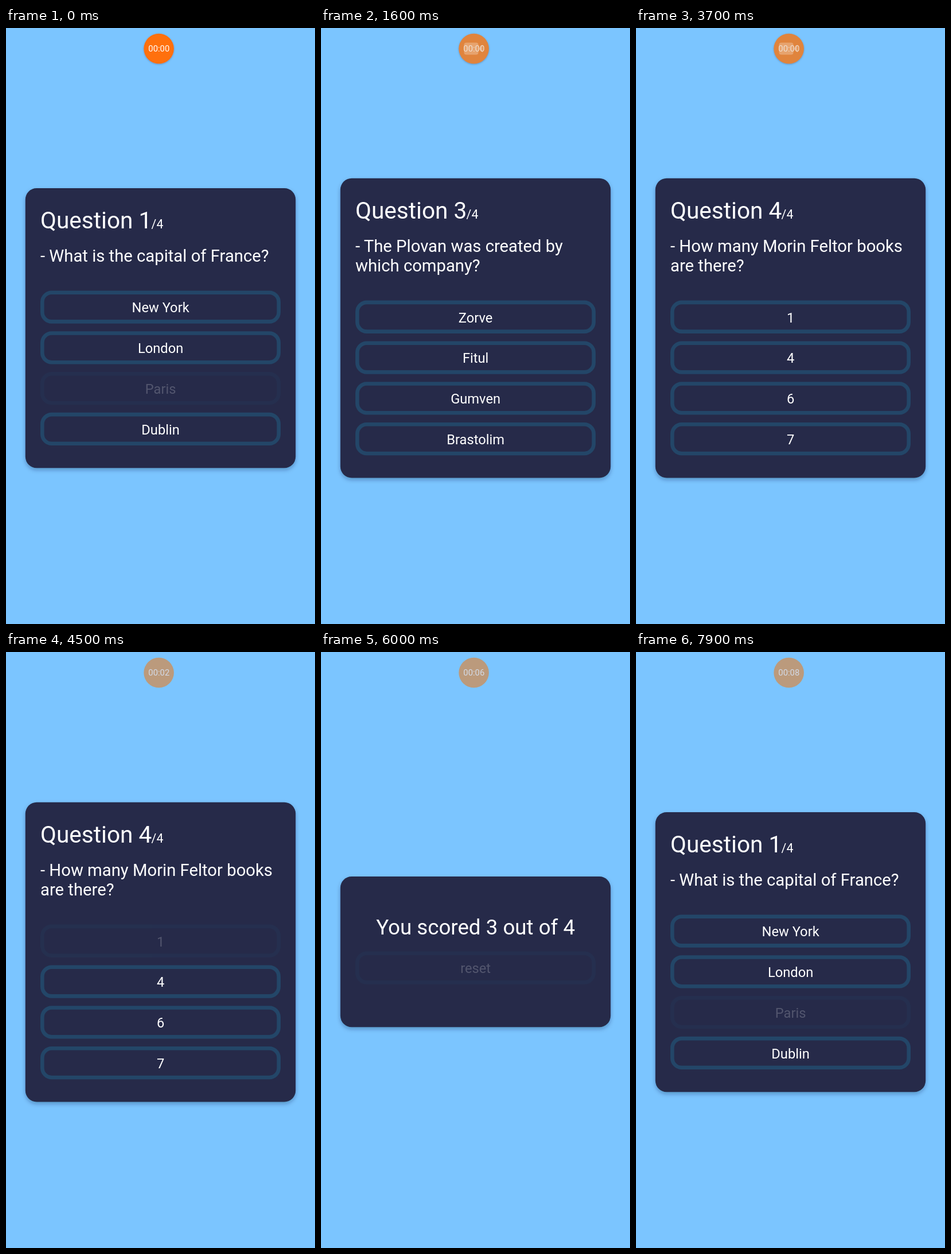
These frames come from a looping animation (539x1038 px, 8 s). An HTML page:

```html
<!DOCTYPE html>
<html lang="en">
<head>
<meta charset="utf-8">
<title>Quiz</title>
<style>
html, body { margin: 0; width: 100%; height: 100%; overflow: hidden; background: #7bc5ff; }
svg { display: block; width: 100vw; height: 100vh; }
text { font-family: Roboto, sans-serif; fill: #fff; }
.mid { text-anchor: middle; }
</style>
</head>
<body>
<svg viewBox="0 0 539 1038">
  <defs>
    <filter id="cardShadow" x="-5%" y="-10%" width="110%" height="120%">
      <feDropShadow dx="0" dy="3.5" stdDeviation="3.5" flood-color="#0a2040" flood-opacity=".3"/>
    </filter>
    <filter id="dotShadow" x="-20%" y="-20%" width="140%" height="140%">
      <feDropShadow dx="0" dy="1" stdDeviation="1.8" flood-color="#4a5a70" flood-opacity=".5"/>
    </filter>
  </defs>
  <g id="card"></g>
  <g id="timer"></g>
</svg>
<script>
const LOOP = 8000;
const STEP = 70.8;   // distance between answer buttons
const MID = 269.6;

const quiz = [
  { lines: ["- What is the capital of France?"], answers: ["New York", "London", "Paris", "Dublin"] },
  { lines: ["- Who is CEO of Vanlo?"], answers: ["Rolf Danvet", "Egon Tirsk", "Hugo Wellis", "Tomo Brask"] },
  { lines: ["- The Plovan was created by", "which company?"], answers: ["Zorve", "Fitul", "Gumven", "Brastolim"] },
  { lines: ["- How many Morin Feltor books", "are there?"], answers: ["1", "4", "6", "7"] }
];
const RESULT = quiz.length;

// start time, page, pressed button (-1 for none)
const scenes = [
  [0, 0, 2], [200, 1, -1], [1000, 1, 1], [1500, 2, -1], [2900, 2, 0],
  [3100, 3, -1], [4500, 3, 0], [4700, RESULT, -1], [6000, RESULT, 0],
  [6100, 0, -1], [7900, 0, 2]
];
// start time, seconds shown
const clock = [[0, 0], [3900, 2], [4700, 5], [5000, 6], [6300, 7], [7100, 8]];
// start time, disc colour, text colour, ghost icon opacity, shadow
const discs = [
  [0, "#ff6f08", "#fff", 0, true],
  [200, "#f8761a", "#fbeee4", 0, true],
  [500, "#f0792a", "#f4e4d6", .25, true],
  [800, "#e0843c", "#eedfd2", .25, true],
  [3900, "#bb9a7c", "#d3dbe8", 0, false]
];

const at = (list, t) => list.filter(item => item[0] <= t).pop();

const label = (x, y, size, str, cls = "") =>
  `<text x="${x}" y="${y}" font-size="${size}" class="${cls}">${str}</text>`;

const panel = (top, bottom) =>
  `<rect x="33.8" y="${top}" width="471.4" height="${bottom - top}" rx="19.7" fill="#252c4a" filter="url(#cardShadow)"/>`;

const button = (top, str, pressed) =>
  `<g opacity="${pressed ? .2 : 1}">
    <rect x="63.3" y="${top + 3.3}" width="412.4" height="50.7" rx="16.4" fill="none" stroke="#234668" stroke-width="6.6"/>
    ${label(MID, top + 37.9, 23.7, str, "mid")}
  </g>`;

function questionCard(page, pressed) {
  const { lines, answers } = quiz[page];
  const shift = (lines.length - 1) * 17.2;
  const top = 279 - shift;
  return panel(top, 766.3 + shift) +
    label(60, top + 70, 40.6, "Question " + (page + 1)) +
    label(253.6, top + 70, 21.3, "/4") +
    lines.map((line, i) => label(60, top + 128 + i * 34.4, 29.25, line)).join("") +
    answers.map((str, i) => button(457.4 + shift + i * STEP, str, i === pressed)).join("");
}

function resultCard(pressed) {
  return panel(391, 653.3) +
    label(MID, 492, 36.7, "You scored 3 out of 4", "mid") +
    button(521.4, "reset", pressed === 0);
}

function timer(t) {
  const [, fill, ink, ghost, shadow] = at(discs, t);
  const time = "00:" + String(at(clock, t)[1]).padStart(2, "0");
  return `<circle cx="266.6" cy="36" r="26.3" fill="${fill}"${shadow ? ' filter="url(#dotShadow)"' : ""}/>
    <g fill="#fff" opacity="${ghost}">
      <rect x="249.5" y="25.5" width="25" height="21" rx="4"/>
      <path d="M276 35 L282 29 V43 L276 37 Z"/>
    </g>
    <g style="--ink:${ink}"><text x="266.8" y="41.4" font-size="14.8" class="mid" style="fill:var(--ink)">${time}</text></g>`;
}

const last = {};
function show(id, html) {
  if (last[id] === html) return;
  last[id] = html;
  document.getElementById(id).innerHTML = html;
}

function update(t) {
  const [, page, pressed] = at(scenes, t);
  show("card", page === RESULT ? resultCard(pressed) : questionCard(page, pressed));
  show("timer", timer(t));
}

const start = performance.now();
function tick() {
  update((performance.now() - start) % LOOP);
  requestAnimationFrame(tick);
}
tick();
</script>
</body>
</html>
```
